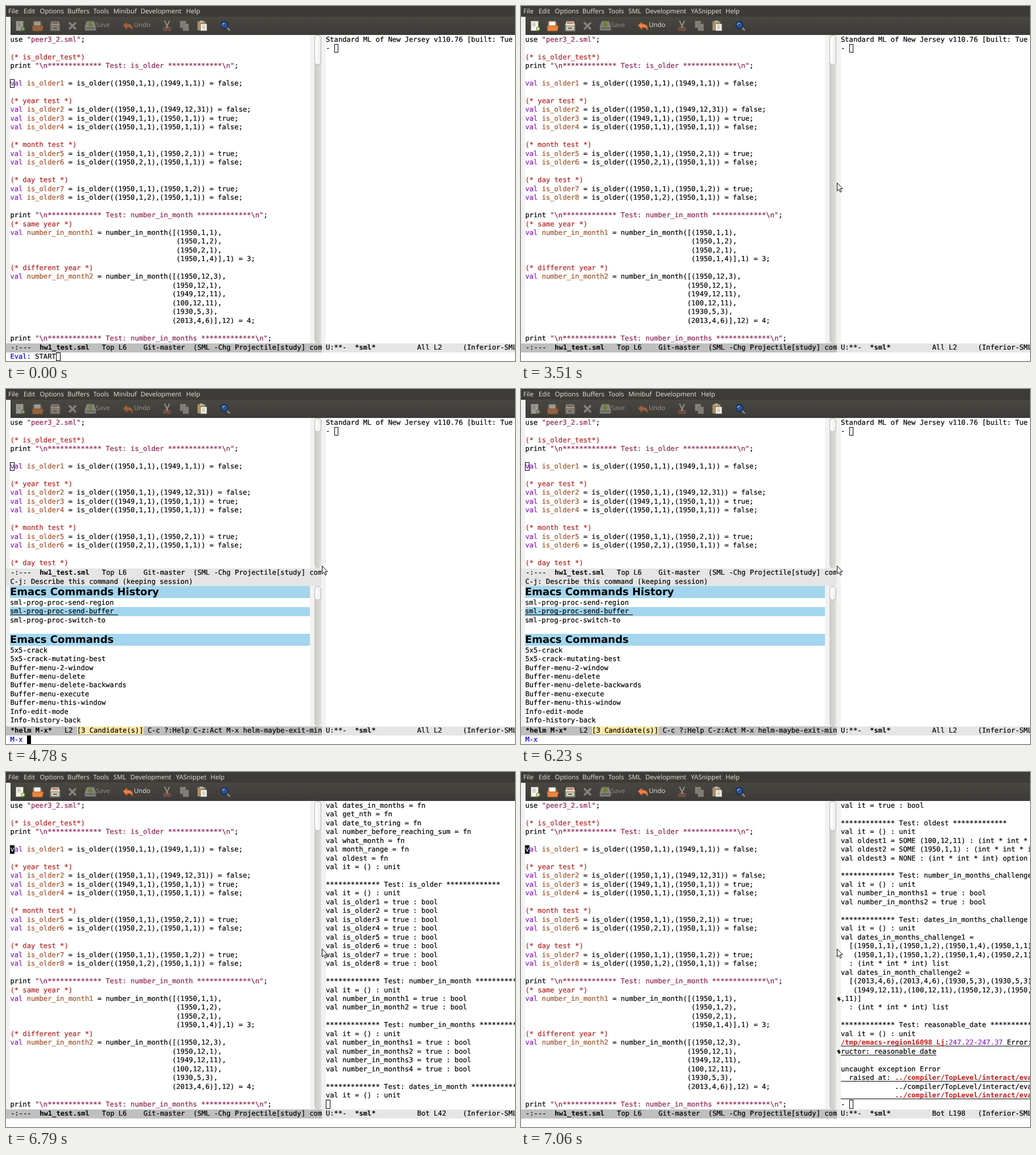
Recreate the animation shown at these times as an HTML page. Size 896 px wide and 625 px high, loop 8 s.

```html
<!DOCTYPE html>
<html lang="en">
<head>
<meta charset="utf-8">
<title>Editor session</title>
<style>
  html, body { margin: 0; width: 100%; height: 100%; overflow: hidden; background: #fff; }
  #stage { position: absolute; left: 0; top: 0; width: 896px; height: 625px; overflow: hidden; color: #000;
    font: 12.158px/15.47px "DejaVu Sans Mono", monospace; text-rendering: geometricPrecision;
    -webkit-text-stroke: .2px; }
  #stage div { position: absolute; overflow: hidden; white-space: pre; box-sizing: border-box; }
  #stage svg { position: absolute; left: 0; top: 0; overflow: visible; }
  .bar, .bar div { font: 11.4px/16px "Noto Sans", "Open Sans", sans-serif; color: #dfdbd2; }
  .bar, .title, b, .err { -webkit-text-stroke: 0; }
  .kw { color: #8a1bc4; } .var { color: #a0522d; } .str { color: #8b2252; } .com { color: #b22222; }
  .prompt { color: #0000cd; }
  .err { color: #c41a16; font-weight: bold; }
  .num { color: #8b2bc4; }
  .tag { background: #fde9a9; }
  .title { font: bold 18px/21.4px "DejaVu Sans", sans-serif; }
  u { text-underline-offset: 2px; }
</style>
</head>
<body>
<div id="stage"></div>
<script>
const LOOP = 8000, CELL = 7.32, ROW = 15.47, LEFT = 7.4, RIGHT = 563, TOP = 51.7, ROWS = 35;
const ACTIVE = '#bfbfbf', INACTIVE = '#e5e5e5', FRINGE = '#f2f2f2', BLUE = '#a3d6ee';
const STARS = '*'.repeat(13);

const code = String.raw`use "peer3_2.sml";

(* is_older_test*)
print "\n${STARS} Test: is_older ${STARS}\n";

val is_older1 = is_older((1950,1,1),(1949,1,1)) = false;

(* year test *)
val is_older2 = is_older((1950,1,1),(1949,12,31)) = false;
val is_older3 = is_older((1949,1,1),(1950,1,1)) = true;
val is_older4 = is_older((1950,1,1),(1950,1,1)) = false;

(* month test *)
val is_older5 = is_older((1950,1,1),(1950,2,1)) = true;
val is_older6 = is_older((1950,2,1),(1950,1,1)) = false;

(* day test *)
val is_older7 = is_older((1950,1,1),(1950,1,2)) = true;
val is_older8 = is_older((1950,1,2),(1950,1,1)) = false;

print "\n${STARS} Test: number_in_month ${STARS}\n";
(* same year *)
val number_in_month1 = number_in_month([(1950,1,1),
${' '.repeat(40)}(1950,1,2),
${' '.repeat(40)}(1950,2,1),
${' '.repeat(40)}(1950,1,4)],1) = 3;
(* different year *)
val number_in_month2 = number_in_month([(1950,12,3),
${' '.repeat(39)}(1950,12,1),
${' '.repeat(39)}(1949,12,11),
${' '.repeat(39)}(100,12,11),
${' '.repeat(39)}(1930,5,3),
${' '.repeat(39)}(2013,4,6)],12) = 4;

print "\n${STARS} Test: number_in_months ${STARS}\n";`
  .replace(/(\(\*.*?\*\))|(".*?")|\b(val)( \w+)/g, (all, com, str, kw, name) =>
    com ? `<span class="com">${com}</span>` :
    str ? `<span class="str">${str}</span>` :
    `<span class="kw">${kw}</span><span class="var">${name}</span>`);

// Interpreter transcript
const UNIT = 'val it = () : unit';
const header = name => ['', `${STARS} Test: ${name} ${STARS}`, UNIT];
const checks = (name, count) => [...header(name),
  ...Array.from({ length: count }, (_, i) => `val ${name}${i + 1} = true : bool`)];
const ints = pairs => pairs.split(' ').map(p => `val ${p.replace('=', ' = ')} : int`);
const months = 'jan feb mar apr may jun jul aug sep oct nov dec'.split(' ');
const functions = ('is_older number_in_month number_in_months dates_in_month dates_in_months get_nth ' +
  'date_to_string number_before_reaching_sum what_month month_range oldest').split(' ');
const source = '../compiler/TopLevel/interact/evalloop.sml:66.19-66.27';

const transcript = [
  'Standard ML of New Jersey v110.76 [built: Tue',
  '- [opening /tmp/emacs-region16098_Lj]',
  '[opening peer3_2.sml]',
  ...functions.map(name => `val ${name} = fn`),
  UNIT,
  ...checks('is_older', 8), ...checks('number_in_month', 2), ...checks('number_in_months', 4),
  ...checks('dates_in_month', 8), ...checks('dates_in_months', 8),
  ...checks('get_nth', 8), ...checks('date_to_string', 9),
  ...header('number_before_reaching_sum'),
  'val int_list = [1,2,3,4,5,6,7] : int list',
  ...ints('n1=1 n2=2 n2=3 n3=4 n4=0'),
  ...header('what_month'),
  ...ints('m1=12 m2=1 m3=4 m4=7'),
  ...months.flatMap((m, i) => ['', UNIT, ...ints(`${m}Start=${i + 1} ${m}End=${i + 1}`)]),
  ...checks('month_range', 13),
  'val it = true : bool',
  ...header('oldest'),
  'val oldest1 = SOME (100,12,11) : (int * int * int) option',
  'val oldest2 = SOME (1950,1,1) : (int * int * int) option',
  'val oldest3 = NONE : (int * int * int) option',
  ...header('number_in_months_challenge'),
  'val number_in_months1 = true : bool',
  'val number_in_months2 = true : bool',
  ...header('dates_in_months_challenge'),
  'val dates_in_months_challenge1 =',
  '  [(1950,1,1),(1950,1,2),(1950,1,4),(1950,1,1),',
  '   (1950,1,1),(1950,1,2),(1950,1,4),(1950,2,1)]',
  '  : (int * int * int) list',
  'val dates_in_month_challenge2 =',
  '  [(2013,4,6),(2013,4,6),(1930,5,3),(1930,5,3),',
  '   (1949,12,11),(100,12,11),(1950,12,3),(1950,12',
  ',11)]',
  '  : (int * int * int) list',
  ...header('reasonable_date'),
  '<u><span class="err">/tmp/emacs-region16098_Lj</span>:<span class="num">247.22-247.37</span> Error: unbound</u>',
  '<u>ructor: reasonable_date</u>',
  '',
  'uncaught exception Error',
  `<u>  raised at: <span class="err">${source}</span></u>`,
  `${' '.repeat(13)}${source}`,
  `<u>${' '.repeat(13)}<span class="err">${source}</span></u>`,
];

// Value of the last entry whose time has passed
const at = (t, ...track) => track.reduce((value, [time, next]) => t >= time ? next : value, undefined);

const stateAt = t => ({
  minibufMenu: at(t, [0, true], [2000, false], [3890, true], [6630, false]),
  dimTools: at(t, [0, true], [2050, false], [3890, true], [6690, false]),
  helm: t >= 3940 && t < 6560,
  helmRow: t < 4740 ? 0 : 1,
  helmLine: t < 4780 ? 1 : 2,
  pointer: t >= 890,
  codeCursor: at(t, [0, 'hollow'], [2050, 'solid'], [2520, ''], [3010, 'solid'], [3510, ''],
    [3990, 'hollow'], [6690, 'solid']),
  mini: at(t, [0, 'Eval: START'], [2050, ''], [3890, 'M-x '], [6690, '']),
  miniCursor: at(t, [0, 'hollow'], [1020, 'solid'], [1580, ''], [3990, 'solid'], [4400, ''],
    [4740, 'solid'], [5240, ''], [5720, 'solid'], [6230, '']),
  lines: at(t, [0, 2], [6740, 14], [6790, 42], [6840, 66], [6890, 90], [6940, 118], [7000, 158], [7060, 198]),
});

const box = (x, y, w, h, style = '', content = '', cls = '') =>
  `<div class="${cls}" style="left:${x}px;top:${y}px;width:${w}px;height:${h}px;${style}">${content}</div>`;
const fill = color => `background:${color};`;

function cursor(kind, x, y, letter = '') {
  if (!kind) return '';
  return kind === 'solid'
    ? box(x, y, CELL, ROW, 'background:#000;color:#fff;', letter)
    : box(x, y, CELL + .4, ROW, 'border:1px solid #000;');
}

function modeline(x, y, w, active, text) {
  return box(x, y, w, 15.6, fill(active ? ACTIVE : INACTIVE) + `padding-left:${x ? 7 : 8}px;`, text);
}

function scrollbar(top, bottom, thumb) {
  return box(543, top, 12, bottom - top, 'background:linear-gradient(90deg,#cbc9c6,#e0dedb);border-radius:6px;') +
    box(543, top, 12, thumb, 'background:linear-gradient(90deg,#fff,#ececea);border:1px solid #b5b3b0;border-radius:6px;');
}

function menuBar(minibuf) {
  const items = { File: 4, Edit: 31, Options: 59.5, Buffers: 108, Tools: 153.5,
    ...(minibuf ? { Minibuf: 189, Development: 237, Help: 317 }
                : { SML: 189, Development: 219, YASnippet: 299, Help: 360 }) };
  return box(0, 0, 896, 20, fill('#3c3b37'), Object.entries(items)
    .map(([name, x]) => box(x, 1.6, 90, 17, '', name)).join(''), 'bar');
}

function toolBar(dim) {
  const icon = (x, faded, shapes) => `<g transform="translate(${x} 26)" opacity="${faded ? .5 : 1}">${shapes}</g>`;
  const page = (x, y, w, h, color = '#f4f3ee') =>
    `<rect x="${x}" y="${y}" width="${w}" height="${h}" fill="${color}" stroke="#8d8b82"/>`;
  const textLines = (x, y) => `<path d="M${x} ${y}h6m-6 2.5h6m-6 2.5h6" stroke="#a5a39b"/>`;
  const icons = [
    icon(17, dim, page(.5, .5, 13, 17) + textLines(3, 4) +
      '<circle cx="13" cy="14" r="3.500" fill="#73b32d"/><path d="M13 12v4m-2-2h4" stroke="#fff" stroke-width="1.5"/>'),
    icon(46, dim, '<path d="M1 2h7l2 2h8v12H1z" fill="#a8551b"/>' + page(3, 1, 12, 9) +
      '<path d="M0 9h20l-2 9H1z" fill="#e8863c" stroke="#b35a1d"/>'),
    icon(78, dim, '<path d="M2 1h13l2 6v11H0V7z" fill="#e4e0d5" stroke="#7d7869"/>' +
      '<path d="M3 4h11" stroke="#c9673a" stroke-width="2.500"/><path d="M1 9h15v8H1z" fill="#d3cebf" stroke="#6d685b"/>' +
      '<path d="M5 13h7" stroke="#5d594e" stroke-width="2"/>'),
    icon(109, true, '<path d="M2 3L14 15M14 3L2 15" stroke="#c4c2bb" stroke-width="3.6"/>'),
    icon(139, true, '<path d="M3 1h13l3 9v7H0v-7z" fill="#c8c6bd" stroke="#8d8b82"/><path d="M2 13h15" stroke="#77756d" stroke-width="2"/>' +
      '<path d="M7 0h5v6h3l-5.500 6L4 6h3z" fill="#93b83d"/>'),
    icon(206, dim, '<path d="M0 8L7 2v4c7-1 11 3 10 11-2-4-5-6-10-5v4z" fill="#ec8148" stroke="#b4521f"/>'),
    icon(277, true, '<path d="M2 0l6 12M11 0L5 12" stroke="#dedcd5" stroke-width="2"/>' +
      '<g fill="none" stroke="#d7655a" stroke-width="2"><circle cx="3" cy="14.500" r="2.500"/><circle cx="10" cy="14.500" r="2.500"/></g>'),
    icon(306, true, page(.5, .5, 10, 12, '#c4c2bb') + page(5.5, 5.5, 10, 12, '#c4c2bb') + textLines(8, 9)),
    icon(337, false, page(.5, 1.5, 13, 15, '#b98d4e') + page(4, 0, 6, 3, '#d4d2ca') + page(5.5, 5.5, 11, 12) + textLines(8, 9)),
    icon(377, false, '<path d="M11 11l6 6" stroke="#8f8d87" stroke-width="2.500"/>' +
      '<circle cx="7.500" cy="7.500" r="6" fill="#2f5590" stroke="#14305f" stroke-width="2"/><path d="M4 7a4 4 0 0 1 4-3" fill="none" stroke="#9fbde3" stroke-width="1.500"/>'),
  ];
  return box(0, 19, 8, 32, fill(FRINGE)) +
    box(8, 19, 888, 32, 'background:linear-gradient(#484742,#3c3b37);') +
    `<svg width="896" height="60">${icons.join('')}</svg>` +
    box(158, 26, 40, 17, 'color:#8b8981;', 'Save', 'bar') +
    box(225, 26, 40, 17, dim ? 'color:#96948b;' : '', 'Undo', 'bar');
}

function codePane(s) {
  const bottom = s.helm ? 316 : 594;
  return box(0, 51, 555, bottom - 51, fill(FRINGE)) +
    box(7, 51, 528, bottom - 51, fill('#fff')) +
    box(LEFT, TOP, 528, bottom - TOP, '', code) +
    cursor(s.codeCursor, LEFT, TOP + 5 * ROW - .5, 'v') +
    scrollbar(51, bottom, s.helm ? 25 : 53) +
    modeline(0, bottom, 555.5, !s.helm,
      '-:---  <b>hw1_test.sml</b>   Top L6    Git-master  (SML -Chg Projectile[study] company');
}

function helmPane(s) {
  const recent = ['sml-prog-proc-send-region', 'sml-prog-proc-send-buffer', 'sml-prog-proc-switch-to'];
  const commands = '5x5-crack 5x5-crack-mutating-best Buffer-menu-2-window Buffer-menu-delete ' +
    'Buffer-menu-delete-backwards Buffer-menu-execute Buffer-menu-this-window Info-edit-mode Info-history-back';
  const title = (y, text) => box(7, y, 528, 21.4, fill(BLUE), text, 'title');
  const firstRow = 368.8;
  const action = s.helmLine === 1 ? 'RET/f1/f2/f-n:NthAct C-' : 'M-x helm-maybe-exit-minibuffer';
  return box(0, 331.6, 555.5, 15.4, fill(INACTIVE) + `padding-left:${LEFT}px;`, 'C-j: Describe this command (keeping session)') +
    box(0, 347, 555, 247, fill(FRINGE)) + box(7, 347, 528, 247, fill('#fff')) +
    title(347, 'Emacs Commands History') +
    recent.map((name, i) => box(7, firstRow + i * ROW, 528, ROW,
      i === s.helmRow ? fill(BLUE) : '', i === s.helmRow ? `<u>${name} </u>` : name)).join('') +
    title(430.8, 'Emacs Commands') +
    box(LEFT, 452.6, 528, 141, '', commands.replaceAll(' ', '\n')) +
    scrollbar(347, 594, 25) +
    modeline(0, 594, 555.5, true,
      `<b>*helm M-x*</b>   L${s.helmLine} <span class="tag">[3 Candidate(s)]</span> C-c ?:Help C-z:Act ${action}`);
}

function replPane({ lines }) {
  const first = Math.max(0, lines - ROWS), done = lines === transcript.length + 1;
  const prompt = lines === 2 || done ? '- ' : '';
  const shown = [...transcript.slice(first, lines - 1), prompt];
  const wrapMark = row => `<path transform="translate(556.500 ${TOP + row * ROW + 4})"
    d="M5 1H2.500Q1 1 1 2.500T2.500 4.500H4M3 2.500l2.500 2L3 6.500z" fill="none" stroke="#000" stroke-width="1.300"/>`;
  const position = `${lines > ROWS ? 'Bot' : 'All'} L${lines}`.padEnd(11);
  return box(555, 51, 7.5, 543, fill(FRINGE)) +
    box(RIGHT, TOP, 333, 542, '', shown.join('\n')) +
    (done ? `<svg width="896" height="625">${wrapMark(22)}${wrapMark(28)}</svg>` : '') +
    cursor('hollow', RIGHT + prompt.length * CELL, TOP + (shown.length - 1) * ROW - .5) +
    modeline(556, 594, 340, false, `U:**-  <b>*sml*</b>          ${position}(Inferior-SML:run`);
}

function miniBuffer(s) {
  return box(LEFT, 609.7, 880, 15.5, '', s.mini.replace(/^\S+/, '<span class="prompt">$&</span>')) +
    (s.mini ? cursor(s.miniCursor, LEFT + s.mini.length * CELL, 609.5) : '');
}

const pointer = `<svg width="896" height="625"><path d="M556.500 311.500v14l3.200-3 2.300 5.200 2.200-1-2.300-5h4.300z"
  fill="#fff" stroke="#000"/></svg>`;

const stage = document.getElementById('stage');
let shownKey = '';

function draw(now) {
  const s = stateAt(now % LOOP), key = JSON.stringify(s);
  if (key !== shownKey) {
    shownKey = key;
    stage.innerHTML = menuBar(s.minibufMenu) + toolBar(s.dimTools) + codePane(s) +
      (s.helm ? helmPane(s) : '') + replPane(s) + miniBuffer(s) + (s.pointer ? pointer : '');
  }
}

const start = performance.now();
function tick() {
  draw(performance.now() - start);
  requestAnimationFrame(tick);
}
tick();
</script>
</body>
</html>
```
